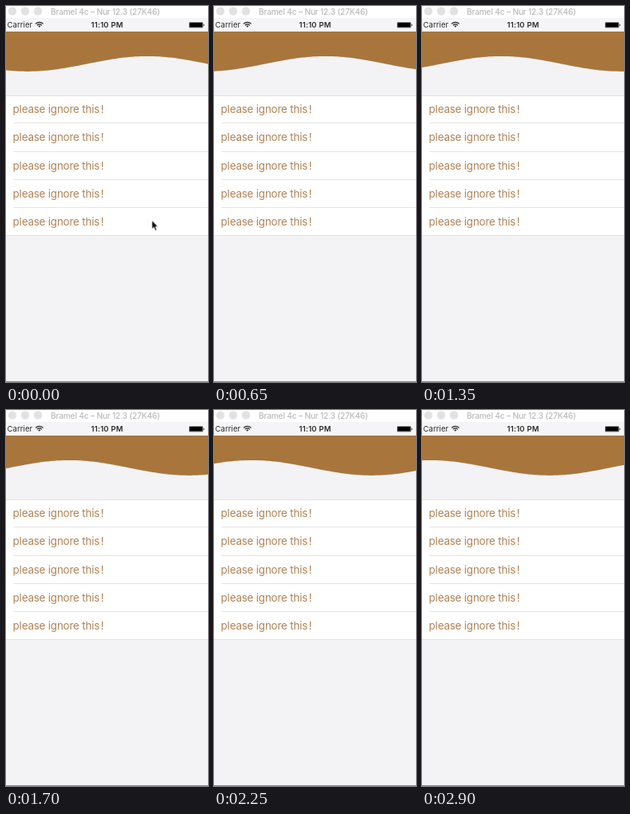
An HTML page that plays this animation: 253x471 px, repeating every 2950 ms.

```html
<!DOCTYPE html>
<html lang="en">
<head>
<meta charset="utf-8">
<title>Wave header</title>
<style>
  html, body { margin: 0; width: 100%; height: 100%; overflow: hidden; background: #f3f3f6; }
  svg { display: block; width: 253px; height: 471px; font-family: Inter, Roboto, sans-serif; }
  .title { font-size: 10.2px; font-weight: 500; letter-spacing: -.2px; fill: #bababa; }
  .status { font-size: 9.48px; letter-spacing: .1px; fill: #2a2a2a; }
  .time { font-weight: 600; letter-spacing: .2px; text-anchor: middle; }
  .row { font-size: 13.4px; letter-spacing: -.19px; fill: #b18255; }
  #wave { fill: #a8763c; animation: drift 2950ms steps(59) infinite; }
  #cursor { animation: leave 2950ms step-end infinite; }
  @keyframes drift { to { transform: translateX(-170px); } }
  @keyframes leave {
    0% { transform: translate(182.8px, 268.6px); }
    1.695% { transform: translate(182.8px, 278px); }
    3.39% { transform: translate(182.8px, 289px); visibility: visible; }
    5.085%, 100% { transform: translate(182.8px, 289px); visibility: hidden; }
  }
</style>
</head>
<body>
<svg viewBox="0 0 253 471">
  <rect width="253" height="471" fill="#f3f3f6"/>
  <rect width="253" height="15" fill="#fff"/>
  <g fill="#e2e2e2">
    <circle cx="8" cy="6.5" r="5.2"/>
    <circle cx="24" cy="6.5" r="5.2"/>
    <circle cx="40" cy="6.5" r="5.2"/>
  </g>
  <text class="title" x="56" y="10.5">Bramel 4c – Nur 12.3 (27K46)</text>

  <rect y="15" width="253" height="17" fill="#f5f5f7"/>
  <text class="status" x="1.5" y="27">Carrier</text>
  <text class="status time" x="126.6" y="27">11:10 PM</text>
  <g fill="none" stroke="#222" stroke-width="1.2">
    <path d="M37 22.3Q41.8 18.3 46.6 22.3M38.8 24.2Q41.8 21.7 44.8 24.2"/>
    <path d="M40.3 25.2Q41.8 24 43.3 25.2L41.8 26.8Z" fill="#222" stroke="none"/>
  </g>
  <rect x="229" y="20" width="18" height="7.6" rx="1.6" fill="#888"/>
  <rect x="230" y="21" width="16" height="5.6" rx=".6" fill="#000"/>
  <rect x="247.2" y="22.4" width="1.2" height="2.8" rx=".6" fill="#555"/>

  <path id="wave"/>

  <rect y="112" width="253" height="176" fill="#fff"/>
  <path d="M0 112.5H253M0 287.5H253" stroke="#e4e4e6"/>
  <g id="rows"></g>
  <rect y="470" width="253" height="1" fill="#888"/>
  <path id="cursor" d="M0 0V10.6L2.4 8.4L4.2 12.8L6 12L4.2 7.8H7.4Z" fill="#000" stroke="#fff" stroke-width=".7"/>
</svg>
<script>
  const crest = 177, period = 300, middle = 72.4, height = 9.5;
  let d = 'M0 32';
  for (let x = 0; x <= 430; x += 2) {
    const y = middle - height * Math.cos(2 * Math.PI * (x - crest) / period);
    d += `L${x} ${y.toFixed(2)}`;
  }
  document.getElementById('wave').setAttribute('d', d + 'V32Z');

  const rowHeight = 35.25;
  let rows = '';
  for (let i = 0; i < 5; i++) {
    const y = 134 + i * rowHeight;
    const line = Math.floor(111.5 + i * rowHeight) + 0.5;
    rows += `<text class="row" x="8.6" y="${y}">please ignore this<tspan dx="1.6">!</tspan></text>`;
    if (i) rows += `<path d="M9 ${line}H253" stroke="#e4e4e6"/>`;
  }
  document.getElementById('rows').innerHTML = rows;
</script>
</body>
</html>
```
